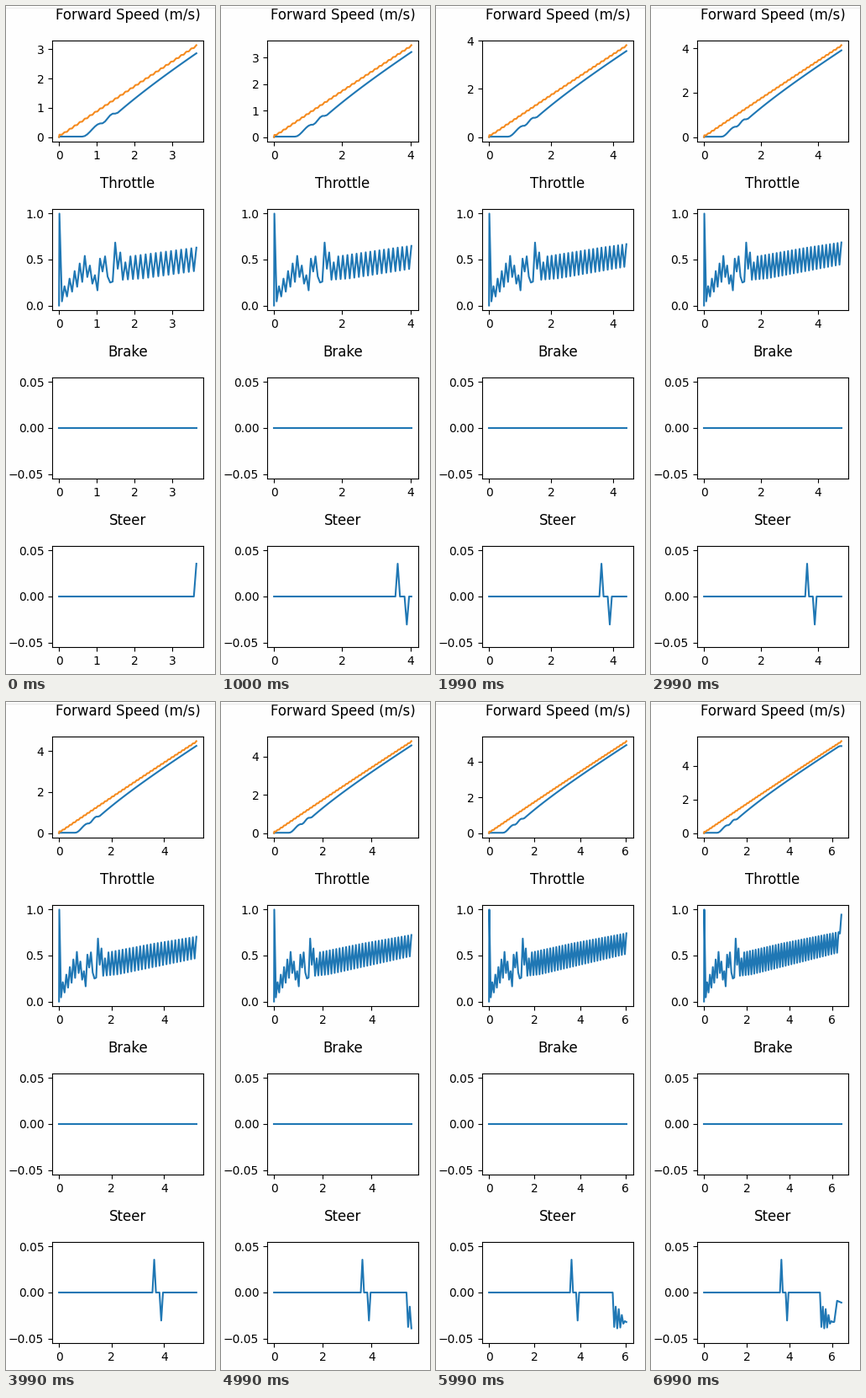
A matplotlib script that plays this animation: 249x793 px, repeating every 7990 ms.

```python
import numpy as np
import matplotlib.pyplot as plt
from matplotlib.animation import FuncAnimation
from matplotlib.lines import Line2D

W, H, DPI = 249, 793, 100
STEP_MS, STEPS = 47, 170          # 7990 ms per loop
UPDATES = np.array([0, 1000, 1990, 2990, 3990, 4990, 5990, 6990])
FIRST, PER_UPDATE, LAST = 54, 6, 96
BLUE, ORANGE = "#1f77b4", "#f58b1f"

# Simulation samples with a fixed time step; every signal starts at zero.
k = np.arange(LAST + 1)
t = 0.01 + 0.067 * k
even = k % 2 == 0
ramp = 0.04 + 0.868 * t - 0.0038 * t ** 2


def from_rest(values):
    return np.r_[0, values]


def ease(start, end):
    x = np.clip((t - start) / (end - start), 0, 1)
    return x * x * (3 - 2 * x)


def target_speed():
    return np.maximum(ramp - np.where(even, 0, 0.045), 0.08)


def forward_speed():
    """Two gear-like steps, then a ramp that closes in on the target."""
    launch = 0.015 + 0.45 * ease(0.62, 1.1) + 0.335 * ease(1.13, 1.43)
    cruise = ramp - 0.21 - 0.29 * np.exp((1.75 - t) / 1.3)
    return np.clip(cruise, launch, 5.18)


def throttle():
    """Alternate between an upper and a lower envelope."""
    high = np.interp(k, [0, 2, 10, 14, 16, 18, 20, 22, 26, 28, 54, 94, 96],
                     [1, .21, .54, .33, .51, .535, .25, .685, .47, .535,
                      .63, .755, .945])
    low = np.interp(k, [1, 11, 15, 17, 21, 23, 25, 33, 93, 95],
                    [.045, .31, .165, .37, .26, .40, .28, .295, .53, .74])
    return np.where(even, high, low)


def steer():
    """Two single kicks, then a damped wobble around a slow correction."""
    n = k - 82
    centre = np.interp(n, [-1, 0, 7, 9, 11, 14],
                       [0, -.026, -.032, -.032, -.009, -.011])
    wobble = 0.0115 * np.exp(-(n / 5.5) ** 4) * np.where(even, -1, 1)
    kicks = 0.0357 * (k == 54) - 0.0305 * (k == 58)
    return kicks + centre + np.where(n >= 0, wobble, 0)


time = from_rest(t)
fig = plt.figure(figsize=(W / DPI, H / DPI), dpi=DPI, facecolor="#fefefe")
fig.add_artist(Line2D([0, 1], [1 - 1.5 / H] * 2, color="#ececec", lw=1))


def panel(title, row, *series):
    """Add one plot and return it with its (line, values) pairs."""
    ax = fig.add_axes([55 / W, (632 - 200 * row) / H, 180 / W, 120 / H])
    ax.set_title(title, pad=24.5 * 72 / DPI, y=1)
    return ax, [(ax.plot([], [], color=c)[0], from_rest(v))
                for v, c in series]


panels = [
    panel("Forward Speed (m/s)", 0,
          (forward_speed(), BLUE), (target_speed(), ORANGE)),
    panel("Throttle", 1, (throttle(), BLUE)),
    panel("Brake", 2, (0 * t, BLUE)),
    panel("Steer", 3, (steer(), BLUE)),
]
speed_ax = panels[0][0]
top_speed = panels[0][1][1][1]
panels[1][0].set_ylim(-0.05, 1.05)
for ax, _ in panels[2:]:
    ax.set_ylim(-0.055, 0.055)


def update(i):
    n_update = np.sum(UPDATES < (i + 1) * STEP_MS) - 1
    n = FIRST + PER_UPDATE * n_update + 2
    end = time[n - 1]
    for ax, lines in panels:
        ax.set_xlim(-0.05 * end, 1.05 * end)
        for line, values in lines:
            line.set_data(time[:n], values[:n])
    peak = top_speed[:n].max()
    speed_ax.set_ylim(-0.05 * peak, 1.05 * peak)
    return []


anim = FuncAnimation(fig, update, frames=STEPS, interval=STEP_MS,
                     repeat=True, repeat_delay=0)
plt.show()
```
